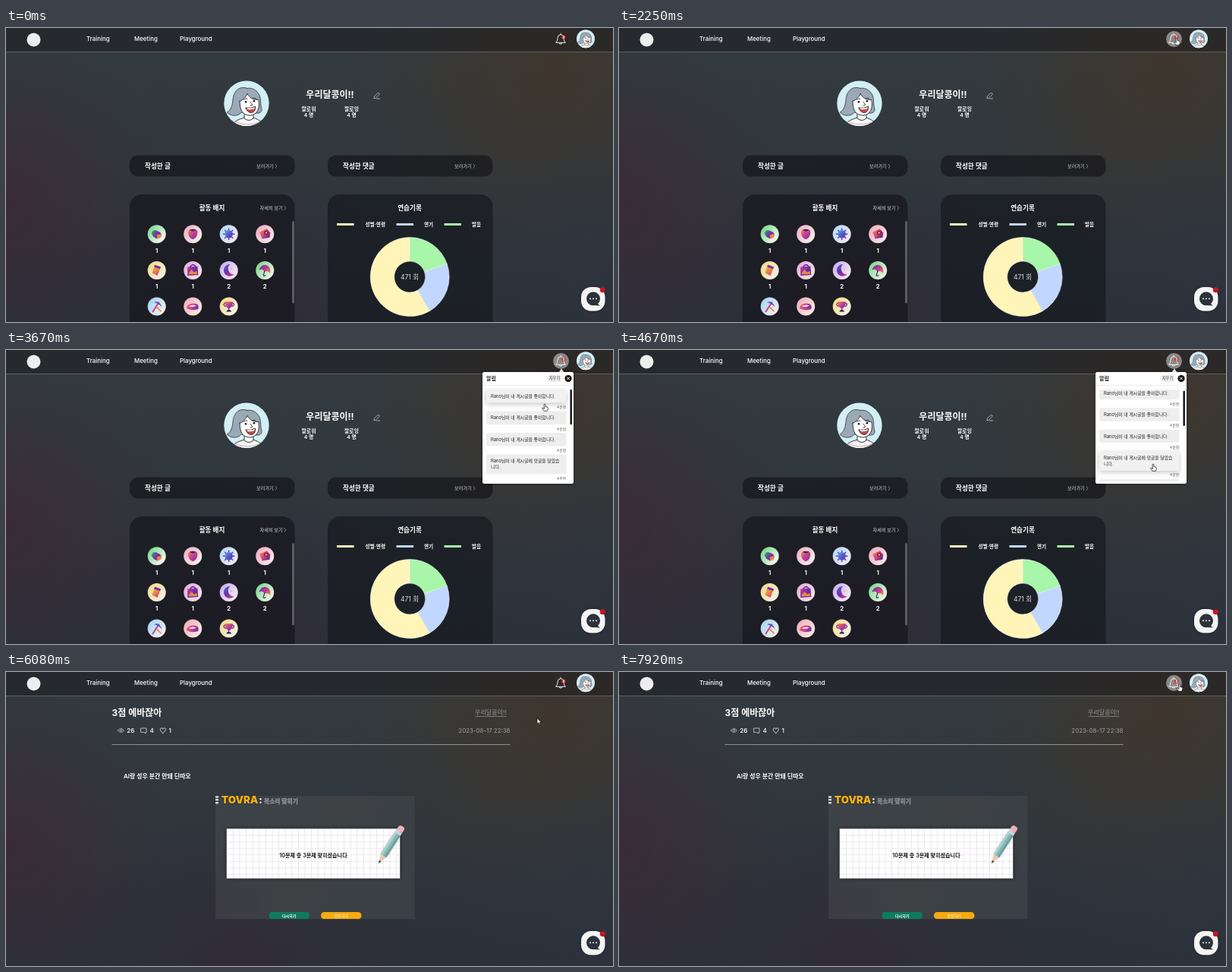
An HTML page with a canvas that plays this animation: 800 px wide and 387 px high, repeating every 8000 ms.

```html
<!DOCTYPE html>
<html lang="ko">
<head>
<meta charset="utf-8">
<title>Profile and alerts</title>
<style>
html, body { margin: 0; width: 100%; height: 100%; overflow: hidden; background: #2e343b; }
canvas { display: block; width: 800px; height: 387px; }
</style>
</head>
<body>
<canvas id="stage"></canvas>
<script>
const W = 800, H = 387, LOOP = 8000;
const FONT = 'Inter, "Noto Sans CJK KR", "Noto Sans CJK", sans-serif';
const USER = '우리달콩이!!', FAN = 'Rano님이 ';
const T = { open: 2330, remove: 5800, page: 6040 };

const canvas = document.getElementById('stage');
const dpr = window.devicePixelRatio || 1;
canvas.width = W * dpr;
canvas.height = H * dpr;
const c = canvas.getContext('2d');

const clamp = v => Math.max(0, Math.min(1, v));
const ease = p => p < .5 ? 4 * p * p * p : 1 - Math.pow(2 - 2 * p, 3) / 2;
const span = (t, a, b) => ease(clamp((t - a) / (b - a)));

function text(s, x, y, size, color = '#fff', weight = 500, align = 'left') {
  c.font = `${weight} ${size}px ${FONT}`;
  c.textAlign = align;
  c.textBaseline = 'alphabetic';
  c.fillStyle = color;
  c.fillText(s, x, y + size * .36);
}
function box(x, y, w, h, r, fill) {
  c.beginPath();
  c.roundRect(x, y, w, h, r);
  c.fillStyle = fill;
  c.fill();
}
function disc(x, y, r, fill) {
  c.beginPath();
  c.arc(x, y, r, 0, 7);
  c.fillStyle = fill;
  c.fill();
}
function shape(d, fill, line, width = 1) {
  const p = new Path2D(d);
  if (fill) { c.fillStyle = fill; c.fill(p); }
  if (line) { c.strokeStyle = line; c.lineWidth = width; c.stroke(p); }
}
function at(x, y, scale, draw, turn = 0) {
  c.save();
  c.translate(x, y);
  c.rotate(turn);
  c.scale(scale, scale);
  c.lineJoin = c.lineCap = 'round';
  draw();
  c.restore();
}
function ramp(x0, y0, x1, y1, ...colors) {
  const g = c.createLinearGradient(x0, y0, x1, y1);
  colors.forEach((v, i) => g.addColorStop(i / (colors.length - 1), v));
  return g;
}
function glow(x, y, r, rgb, a) {
  const g = c.createRadialGradient(x, y, 0, x, y, r);
  g.addColorStop(0, `rgba(${rgb},${a})`);
  g.addColorStop(1, `rgba(${rgb},0)`);
  c.fillStyle = g;
  c.fillRect(0, 0, W, H);
}

function backdrop() {
  c.fillStyle = ramp(0, 0, 0, H, '#333b40', '#30373d', '#2c303a');
  c.fillRect(0, 0, W, H);
  glow(720, 50, 270, '68,53,38', .7);
  glow(0, 225, 220, '62,40,54', .7);
  glow(310, 387, 240, '50,40,54', .6);
  glow(760, 290, 170, '46,54,66', .5);
}

function avatar(x, y, r) {
  at(x, y, r / 30, () => {
    disc(0, 0, 30, '#d3eff5');
    c.clip();
    shape('M-21 32C-17 22-8 21-3 19L9 19C17 22 22 25 24 32Z', '#f4f8f9', '#333', 1);
    shape('M-14 25Q2 31 17 25M-17 29Q2 35 20 29', null, '#dfa7a2', 1);
    shape('M-3 10L-3 20Q3 25 9 20L9 9Z', '#fff', '#333', 1);
    shape('M1-20C-11-24-17-15-18-6C-19 3-20 8-26 12C-20 18-11 17-7 12L14 13C19 13 21 10 20 7C18 0 20-7 16-13C12-19 6-21 1-20Z', '#9ba9b6', '#424b54', 1);
    shape('M-9-3C-9 8-6 16 5 16C15 15 18 6 16-5C10-4 4-7 1-13C-1-8-5-4-9-3Z', '#fff', '#333', 1);
    disc(-1, -2, 1.3, '#111');
    disc(10, -3, 1.3, '#111');
    shape('M-4-5Q-2-7 1-6M8-7Q10-8 13-6M5-2L8 2L5 3', null, '#333', .9);
    shape('M-1 6Q6 7 12 4Q12 12 6 12.5Q1 12-1 6Z', '#c9474c', '#333', .9);
    shape('M.5 6.3Q6 7 11 5L10.5 7Q6 8.5 1.5 8Z', '#fff');
  });
}

function bell(active, count) {
  if (active) disc(731.5, 14.5, 10.5, '#8b8888');
  at(731, 14.5, 1, () => {
    shape('M-6 4.5Q-4 2.5-4-1Q-4-5.5 0-6Q4-5.5 4-1Q4 2.5 6 4.5Z', null, '#f1f1f1', 1);
    shape('M-1.7 6Q0 7.6 1.7 6M0-7.2L0-6', null, '#f1f1f1', 1);
  });
  disc(734.8, 12.2, 2.6, '#cf2a33');
  text(count, 734.8, 12.3, 4.2, '#fff', 700, 'center');
}

function nav(active, count) {
  c.fillStyle = 'rgba(20,20,24,.42)';
  c.fillRect(0, 0, W, 31);
  c.fillStyle = '#5c5f62';
  c.fillRect(0, 31, W, 1);
  disc(36.5, 15.5, 9, '#eeeeee');
  text('Training', 106, 14.5, 7.9);
  text('Meeting', 169, 14.5, 7.9);
  text('Playground', 229, 14.5, 7.9);
  bell(active, count);
  avatar(764, 14.3, 12);
}

function chat() {
  c.save();
  c.shadowColor = 'rgba(0,0,0,.35)';
  c.shadowBlur = 4;
  box(758, 341, 31.5, 31.5, 13, '#f4f4f5');
  c.restore();
  disc(774, 356.3, 9, '#2b3238');
  shape('M776 360L783 365.5L774 365Z', '#2b3238');
  [-4, 0, 4].forEach(d => disc(774 + d, 356.3, 1.1, '#cfe0ea'));
  disc(786.3, 344.8, 3.5, '#c9141f');
}

// Each badge: two backdrop colours and its little picture.
const P = '#6f2fa8', M = '#c43d94', O = '#f08440', B = '#4a62cf', N = '#34246e';
const badges = [
  ['#7fdc95', '#f3f6ee', () => { shape('M-8-1Q-7-6-2-6L5-3Q8 0 6 4L0 7L-5 4Z', ramp(-7, -5, 6, 6, '#41a06b', P, M)); shape('M0 1L7 0L6 5L1 7Z', O); }],
  ['#f0b6cc', '#f4ece4', () => { shape('M-7-3Q-6-8 0-7Q7-8 7-3Q7 5 0 8Q-7 5-7-3Z', ramp(-6, -7, 6, 8, O, M, P)); shape('M-5-6Q0-9 5-6L0-4Z', N); }],
  ['#b9dcf4', '#eceaf5', () => {
    for (let i = 0; i < 8; i++) at(0, 0, 1, () => box(-.8, -9, 1.6, 4, .8, P), i * Math.PI / 4);
    disc(0, 0, 6, ramp(-5, -5, 5, 5, '#5a9bea', B, P));
  }],
  ['#f2b4c4', '#f5e4e6', () => { shape('M-8-3L3-8L8-2L7 5L-4 7Z', ramp(-8, -4, 7, 7, O, M, N)); disc(2, -2, 3.4, '#9c2430'); disc(2, -2, 1.3, '#f3c2c9'); }],
  ['#f0dc92', '#f2f0df', () => { shape('M-3-8L6-5L1 8L-7 4Z', ramp(-5, -7, 4, 7, '#f4b63c', O, M)); shape('M-3-8L6-5L5-2L-4-5Z', P); }],
  ['#e2b6dc', '#f2dde6', () => { shape('M-8-5L7-6L8 7L-8 8Z', ramp(-7, -5, 7, 8, M, P, N)); shape('M-4-5Q0-11 4-6', null, P, 1.8); shape('M-6 4L-2-1L2 3L6 1L7 6L-6 6Z', O); }],
  ['#ccb5ef', '#f2e6f2', () => { shape('M2-9A9 9 0 1 0 8 6A8.5 8.5 0 0 1 2-9Z', ramp(-7, -7, 6, 8, B, P, M)); disc(4, -2, 1.2, '#f7aa55'); }],
  ['#84dc93', '#e9f2df', () => at(0, 0, 1, () => { shape('M-9 2Q-7-8 0-8Q7-8 9 2L4 0L0 2L-4 0Z', ramp(-8, -6, 8, 4, P, M, O)); shape('M0 1L0 8Q2 9 3 7', null, N, 1.3); }, .3)],
  ['#a8d8f2', '#f0efec', () => { shape('M-6 8L3-6', null, M, 2.2); shape('M-4-6Q3-10 8 1Q2-5-4-6Z', ramp(-4, -7, 8, 2, B, P)); shape('M0 1L6 7', null, O, 1.8); }],
  ['#f2b3c0', '#f5e7dc', () => { shape('M-9 0Q-4-6 5-4Q10-2 8 4Q0 7-9 3Z', ramp(-8, -3, 7, 5, '#e8616f', M, P)); shape('M-6 0Q0-4 5-1Q0 2-6 0Z', '#f7dfd6'); }],
  ['#f3df93', '#f5f1df', () => { shape('M-6-7L6-7Q6 2 0 3Q-6 2-6-7Z', ramp(-6, -7, 5, 4, O, M, P)); shape('M-6-5Q-10-3-5 0M6-5Q10-3 5 0M0 2L0 6', null, P, 1.5); shape('M-4 8L-2 5L2 5L4 8Z', N); }]
];

function barCard(x, label) {
  box(x, 167.5, 217.5, 28, 11, 'rgba(18,19,23,.62)');
  text(label, x + 20, 181.5, 8.6, '#fff', 600);
  text('보러가기 〉', x + 167, 181.5, 6.2, '#cfcfd2', 500);
}

function badgeCard() {
  box(163, 219, 217.5, 190, 16, 'rgba(18,18,25,.62)');
  text('활동 배지', 271.5, 236.8, 8.6, '#fff', 700, 'center');
  text('자세히 보기 〉', 334.5, 236.8, 6.2, '#dedee0');
  box(377, 254, 3, 108.5, 1.5, '#5b5c61');
  badges.forEach(([a, b, draw], i) => {
    const x = 198.7 + i % 4 * 47.5, y = 271.3 + Math.floor(i / 4) * 47.6;
    disc(x, y, 12, ramp(x - 9, y - 7, x + 8, y + 7, a, b));
    at(x, y, .88, draw);
    if (i < 8) text(i === 6 || i === 7 ? '2' : '1', x, y + 21.5, 7.8, '#fff', 700, 'center');
  });
}

function chartCard() {
  const yellow = '#fff5b9', blue = '#c2d7ff', green = '#a8f6a9';
  box(424, 219, 217.5, 190, 16, 'rgba(18,20,25,.6)');
  text('연습기록', 532, 236.8, 8.6, '#fff', 700, 'center');
  [[436, yellow, '성별·연령', 473.5], [514.5, blue, '연기', 551], [577.5, green, '발음', 614]].forEach(([x, color, label, lx]) => {
    box(x, 257, 22.5, 3, 0, color);
    text(label, lx, 258.6, 6.6, '#fff', 700);
  });
  const cuts = [-90, -19, 60, 270].map(d => d * Math.PI / 180);
  [green, blue, yellow].forEach((color, i) => {
    c.beginPath();
    c.arc(532.2, 327.6, 52, cuts[i], cuts[i + 1]);
    c.arc(532.2, 327.6, 20.5, cuts[i + 1], cuts[i], true);
    c.closePath();
    c.fillStyle = color;
    c.fill();
    c.strokeStyle = 'rgba(255,255,255,.8)';
    c.lineWidth = .6;
    c.stroke();
  });
  text('471 회', 532, 328.3, 8.6, '#d9dadd', 400, 'center');
}

function profile() {
  avatar(317, 99.2, 29.7);
  text(USER, 427, 87.5, 12, '#fff', 700, 'center');
  at(488.5, 89, 1, () => shape('M-3.5 3.5L-3 1L2-4L4-2L-1 3ZM0 4L4 4', null, '#c9cacc', .8));
  [['팔로워', 399], ['팔로잉', 455.5]].forEach(([s, x]) => {
    text(s, x, 106.3, 6.8, '#fff', 600, 'center');
    text('4 명', x, 114.8, 6.8, '#fff', 600, 'center');
  });
  barCard(163, '작성한 글');
  barCard(424, '작성한 댓글');
  badgeCard();
  chartCard();
}

const like = ['내 게시글을 좋아합니다.'];
const reply = ['내 게시글에 댓글을 달았습', '니다.'];
const follow = ['회원님을 팔로우 했습니다.'];
const alerts = [like, like, like, reply, follow, like, reply, reply, follow, like];

function scrollAt(t) {
  return 190 * (span(t, 4600, 5000) - span(t, 5150, 5450));
}

function popup(t, mouse) {
  const list = t < T.remove ? alerts : alerts.slice(1);
  const scroll = scrollAt(t), top = 52, view = 121;
  c.save();
  c.shadowColor = 'rgba(0,0,0,.4)';
  c.shadowBlur = 4;
  shape('M728 30L732 24.5L736 30Z', '#fff');
  box(628, 29, 120, 147, 3, '#fff');
  c.restore();
  box(628, 29, 120, 147, 3, '#fff');
  text('알림', 633, 37.6, 7, '#222', 700);
  box(713, 33, 20, 9, 4.5, '#eeeeee');
  text('지우기', 723, 37.6, 5.2, '#333', 500, 'center');
  disc(741, 37.5, 4.6, '#111');
  shape('M739.2 35.7L742.8 39.3M742.8 35.7L739.2 39.3', null, '#fff', 1);
  c.fillStyle = '#e3e3e3';
  c.fillRect(628, 46, 120, .7);

  c.save();
  c.beginPath();
  c.rect(629, top - (scroll < 1 ? 2 : 0), 113, view);
  c.clip();
  let y = top - scroll;
  list.forEach(lines => {
    const h = lines.length > 1 ? 25.7 : 17.6;
    const over = mouse && mouse.x > 633 && mouse.x < 739 && mouse.y >= Math.max(y, top) && mouse.y < y + h + 5;
    c.save();
    if (over) {
      c.shadowColor = 'rgba(0,0,0,.22)';
      c.shadowBlur = 6 * dpr;
      c.shadowOffsetY = 2 * dpr;
    }
    box(633, y, 105.5, h, 2, over ? '#f1f1f1' : '#eeeeee');
    c.restore();
    lines.forEach((s, i) => text((i ? '' : FAN) + s, 639, y + 8.8 + i * 7.8, 5.85, '#222', 400));
    text('4분전', 738.5, y + h + 5.6, 5.1, '#666', 400, 'right');
    y += h + 10.9;
  });
  c.restore();
  const total = t < T.remove ? 316 : 286;
  box(743.5, top + scroll * view / total, 2.4, view * view / total, 1, '#111');
}

function pencil() {
  at(491, 252, 1, () => {
    c.save();
    c.shadowColor = 'rgba(0,0,0,.3)';
    c.shadowBlur = 3;
    box(12, -4.3, 36, 8.6, 0, '#86b9b0');
    c.restore();
    shape('M0 0L12-4.3L12 4.3Z', '#e3cdb0');
    shape('M0 0L4-1.5L4 1.5Z', '#3a3a3a');
    box(12, -4.3, 34, 2.8, 0, '#a9d3ca');
    box(12, 1.7, 34, 2.6, 0, '#6e9ea2');
    box(46, -4.3, 4.5, 8.6, 0, '#c6d3d6');
    box(50.5, -4.3, 7.5, 8.6, [0, 3, 3, 0], '#eeb0bb');
  }, -Math.PI * .317);
}

function result() {
  c.save();
  c.beginPath();
  c.rect(276, 163, 262.5, 162.3);
  c.clip();
  c.fillStyle = ramp(276, 163, 538, 325, '#3c4349', '#3d4144', '#3a4046');
  c.fillRect(276, 163, 263, 163);
  glow(276, 310, 90, '62,48,62', .4);
  [163.5, 167.3, 171.2].forEach(y => box(275, y, 5, 2, 0, '#f3f3f3'));
  c.save();
  c.shadowColor = 'rgba(0,0,0,.8)';
  c.shadowBlur = 2;
  text('TOVRA', 284, 168.5, 13.3, '#f9b116', 900);
  text(':', 333, 168.5, 13.3, '#fff', 900);
  c.restore();
  text('목소리 맞히기', 340, 170, 7.8, '#8f9194', 700);
  c.strokeStyle = '#8f9194';
  c.lineWidth = .4;
  c.strokeText('목소리 맞히기', 340, 170 + 7.8 * .36);

  c.save();
  c.shadowColor = 'rgba(0,0,0,.65)';
  c.shadowBlur = 4;
  box(290.5, 206, 229, 66, 1, '#fff');
  c.restore();
  c.fillStyle = '#e8e2ea';
  for (let x = 299; x < 519; x += 8.6) c.fillRect(x, 206.5, .8, 65);
  for (let y = 214.5; y < 271; y += 8.6) c.fillRect(291, y, 228, .8);
  c.strokeStyle = '#55595c';
  c.lineWidth = .8;
  c.strokeRect(290.5, 206, 229, 66);
  text('10문제 중 3문제 맞히셨습니다', 405, 241, 7.1, '#181818', 600, 'center');
  pencil();
  box(346.5, 316, 53.5, 9.3, 4.6, '#0e7b5e');
  text('다시하기', 373.2, 320.8, 5, '#fff', 600, 'center');
  box(415, 316, 53.5, 9.3, 4.6, '#f5aa10');
  text('확인하기', 441.7, 320.8, 5, '#ffe7a8', 600, 'center');
  c.restore();
}

function post() {
  text('3점 에바잖아', 139.5, 53.2, 12, '#fff', 700);
  text(USER, 659.5, 53.5, 8, '#97989a', 400, 'right');
  c.fillStyle = '#97989a';
  c.fillRect(618.5, 58, 41, .7);
  at(151.5, 77, 1, () => {
    shape('M-4 0Q0-5 4 0Q0 5-4 0Z', null, '#c3c4c7', .8);
    c.beginPath();
    c.arc(0, 0, 1.3, 0, 7);
    c.stroke();
  });
  at(181.5, 77, 1, () => shape('M-3.5-3L3.5-3L3.5 2.3L2.5 2.3L2.5 4L.5 2.3L-3.5 2.3Z', null, '#d5d6d8', .8));
  at(206.8, 77, 1, () => shape('M0 3.4C-5 0-3.8-3.2-2-3.2Q-.5-3.2 0-1.8Q.5-3.2 2-3.2C3.8-3.2 5 0 0 3.4Z', null, '#e5e5e6', .9));
  text('26', 159.3, 77, 8.2);
  text('4', 189.5, 77, 8.2);
  text('1', 214.5, 77, 8.2);
  text('2023-08-17 22:38', 664.5, 77, 7.9, '#a1a2a4', 400, 'right');
  c.fillStyle = '#8d8e90';
  c.fillRect(139.5, 95, 525, 1);
  text('AI랑 성우 분간 안돼 딘따오', 155, 137.5, 7.9, '#fff', 600);
  result();
}

// Mouse stops: time, x, y.
const stops = [
  [1850, 690, 70], [2150, 735, 13], [2450, 735, 13], [2880, 710, 71], [3760, 710, 71],
  [4420, 704, 150], [5300, 704, 150], [5620, 700, 61], [7100, 700, 61], [7500, 738.5, 16]
];
function mouseAt(t) {
  if (t < stops[0][0]) return null;
  let i = 0;
  while (i < stops.length - 2 && t > stops[i + 1][0]) i++;
  const [a, x, y] = stops[i], [b, u, v] = stops[i + 1], p = span(t, a, b);
  return { x: x + (u - x) * p, y: y + (v - y) * p };
}

function pointer(m, hand) {
  at(m.x, m.y, 1, () => shape(hand
    ? 'M-.8 .4Q0-.5 .8 .4L.9 3.5L3.8 4.3Q4.6 4.8 4.3 6.5L3.4 9.3L-1 9.3L-3.5 5.8Q-3.3 4.7-2.2 5.3L-.9 6.3Z'
    : 'M0 0L0 7.3L1.7 5.8L2.9 8.4L4 7.9L2.9 5.4L5.1 5.2Z', '#fff', '#111', .7));
}

function draw(t) {
  const mouse = mouseAt(t), late = t >= T.page, open = t >= T.open && !late;
  const onBell = mouse && Math.hypot(mouse.x - 731.5, mouse.y - 14.5) < 10.5;
  c.setTransform(dpr, 0, 0, dpr, 0, 0);
  backdrop();
  late ? post() : profile();
  nav(onBell || open, t < T.remove ? '9' : '8');
  chat();
  if (open) popup(t, mouse);
  const onList = open && mouse.y > 50 && mouse.x > 633;
  if (mouse) pointer(mouse, onBell || onList);
}

function tick(now) {
  draw(now % LOOP);
  requestAnimationFrame(tick);
}
requestAnimationFrame(tick);
</script>
</body>
</html>
```
